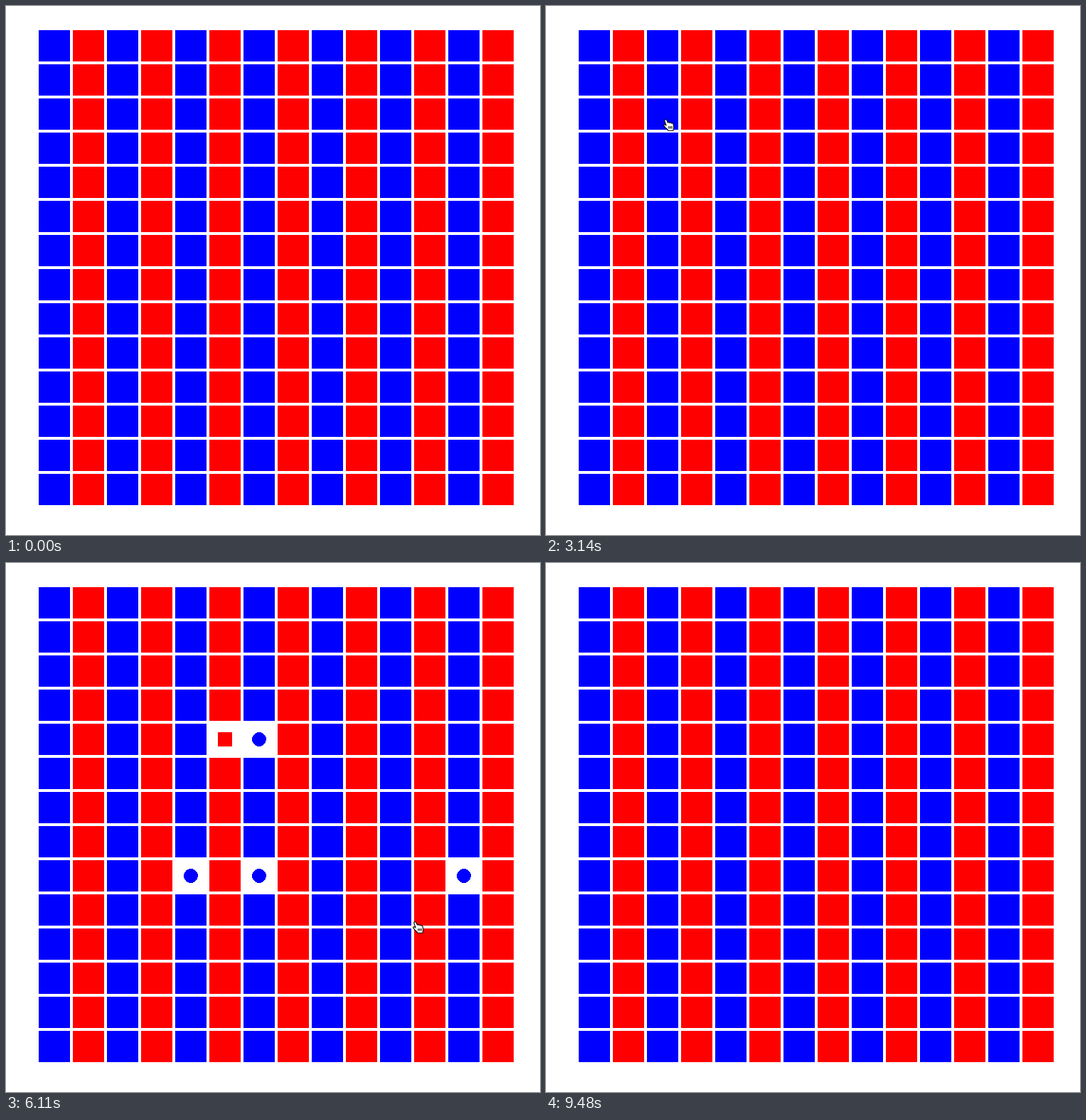
Animation of 751 by 744 pixels, one loop 10000 ms. Source, as an HTML page:

```html
<!DOCTYPE html>
<html lang="en">
<head>
<meta charset="utf-8">
<title>Toggle grid</title>
<style>
html, body { margin: 0; width: 100%; height: 100%; overflow: hidden; background: #fff; }
svg { display: block; width: 751px; height: 744px; }
#grid { shape-rendering: crispEdges; }
</style>
</head>
<body>
<svg viewBox="0 0 751 744">
  <g id="grid"></g>
  <g id="cursor">
    <path id="hand" fill="#fff" stroke="#000" stroke-width="1.1" stroke-linejoin="round"
      d="M-2.6-1C-1.6-1.7-.4-1.2 0-.2L1.4 3C2.2 2.2 3.4 2.4 3.8 3.4C4.6 2.6 6 3 6.4 4C7.4 3.5 8.7 4.1 9 5.1L9.6 8.6C9.9 10.8 9 11.8 9 14.3H1.8C1.2 12.2-1.2 11.2-2.4 9.6L-4.4 7C-4.6 5.6-3 5.2-2 6.2L-1 7L-3.2 .6C-3.4-.1-3.2-.7-2.6-1ZM2.8 8V11.4M4.9 8V11.4M7 8V11.4"/>
    <path id="arrow" fill="#000" stroke="#fff" stroke-width="1.6" paint-order="stroke"
      d="M0 0V14L3.2 11.1L5.4 16L7.7 15L5.5 10.2H9.8Z"/>
  </g>
</svg>
<script>
const LOOP = 10000, STEP = LOOP / 175;
const N = 14, PITCH = 48, CELL = 44, LEFT = 46, TOP = 34, R = 10;
const BLUE = '#00f', RED = '#f00';
const PAUSE = 3; // steps the cursor rests before each click
const PASS = true; // a stop without a click
const ENTER = 6, LEAVE = 165;
const $ = id => document.getElementById(id);

// Step of the click, then the spot in columns and rows, whole numbers being cell centres
const stops = [
  [ENTER, 5.1, 13.2, PASS],
  [18, -.1, -.2], [24, .8, .18], [29, 2, .2],
  [35, 2.4, 1.1, PASS],
  [41, 2, .1], [47, 1, .1], [51, 0, .1],
  [65, 5.1, 4.1], [69, 6, 4.1], [81, 4.15, 7.72], [87, 6, 8.1], [98, 11.7, 8.1],
  [107, 10.6, 9.38, PASS],
  [117, 6, 4], [126, 6, 8], [134, 4.8, 3.9], [142, 4.1, 7.9], [150, 11.9, 8],
  [163, -.1, 0, PASS], [LEAVE + PAUSE, 1.2, 3, PASS]
].map(([step, col, row, pass]) => ({
  step,
  x: LEFT + CELL / 2 + col * PITCH,
  y: TOP + CELL / 2 + row * PITCH,
  cell: pass ? -1 : Math.round(row) * N + Math.round(col)
}));

function shape(tag, attrs) {
  const el = document.createElementNS('http://www.w3.org/2000/svg', tag);
  for (const name in attrs) el.setAttribute(name, attrs[name]);
  return $('grid').appendChild(el);
}

const cells = Array.from({ length: N * N }, (_, i) => {
  const col = i % N, x = LEFT + col * PITCH, y = TOP + Math.floor(i / N) * PITCH;
  const cx = x + CELL / 2, cy = y + CELL / 2, round = col % 2 === 0;
  return {
    cx, cy, round, on: false,
    full: shape('rect', { x, y, width: CELL, height: CELL, fill: round ? BLUE : RED }),
    small: round
      ? shape('circle', { cx, cy, r: R, fill: BLUE })
      : shape('rect', { x: cx - R, y: cy - R, width: 2 * R, height: 2 * R, fill: RED })
  };
});

// Each trip starts at a click, eases to the next stop and sags a little on the way
function cursorAt(k) {
  const next = Math.max(1, stops.findIndex(s => s.step > k));
  const a = stops[next - 1], b = stops[next], dx = b.x - a.x, dy = b.y - a.y;
  const u = Math.max(0, Math.min(1, (k - a.step) / (b.step - a.step - PAUSE)));
  const v = u ** .8, ease = v * v * (3 - 2 * v);
  const sag = .44 * Math.hypot(dx, dy) * u * (1 - u) ** 2;
  return { x: Math.round(a.x + dx * ease), y: Math.round(a.y + dy * ease + sag) };
}

function overShape({ x, y }) {
  return cells.some(c => {
    const dx = Math.abs(x - c.cx), dy = Math.abs(y - c.cy);
    if (c.on && c.round) return Math.hypot(dx, dy) <= R;
    return Math.max(dx, dy) <= (c.on ? R : CELL / 2);
  });
}

const show = (el, on) => el.setAttribute('visibility', on ? 'visible' : 'hidden');

function draw(t) {
  const k = Math.floor((t + 8) / STEP);
  cells.forEach((c, i) => {
    c.on = stops.filter(s => s.cell === i && s.step <= k).length % 2 === 1;
    show(c.full, !c.on);
    show(c.small, c.on);
  });
  const spot = cursorAt(k), hand = overShape(spot);
  const visible = k >= ENTER && k <= LEAVE;
  $('cursor').setAttribute('transform', `translate(${spot.x} ${spot.y})`);
  show($('hand'), visible && hand);
  show($('arrow'), visible && !hand);
}

const start = performance.now();
function tick() {
  draw((performance.now() - start) % LOOP);
  requestAnimationFrame(tick);
}
tick();
</script>
</body>
</html>
```
